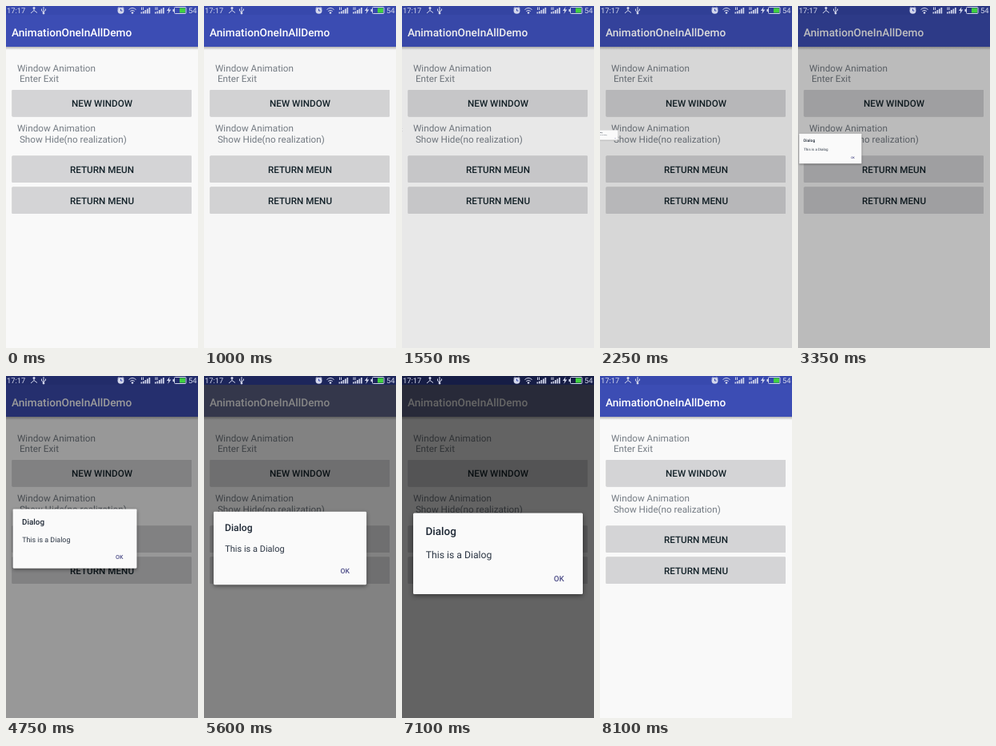
An HTML page for the animation above (8.15 s loop, 240 by 428 pixels).

```html
<!DOCTYPE html>
<html lang="en">
<head>
<meta charset="utf-8">
<title>Window animation demo</title>
<style>
  html, body { margin: 0; width: 100%; height: 100%; overflow: hidden; background: #f9f9f9; }
  svg { display: block; width: 100vw; height: 100vh; }
  text { font-family: Roboto, sans-serif; text-rendering: geometricPrecision; white-space: pre; }
  .label { font-size: 11.7px; fill: #757c84; }
  .caption { font-size: 11.7px; font-weight: 500; fill: #14232a; text-anchor: middle; }
  .button { fill: #d4d4d6; filter: drop-shadow(0 .6px .6px rgba(0, 0, 0, .2)); }
  .status text { font-size: 9.4px; fill: #d3d7ec; }
  .line { fill: none; stroke: #d3d7ec; stroke-width: 1; }
  .solid { fill: #d3d7ec; }
  #card { filter: drop-shadow(0 2px 3px rgba(0, 0, 0, .45)); }
</style>
</head>
<body>
<svg viewBox="0 0 240 428" preserveAspectRatio="none">
  <defs>
    <linearGradient id="shade" x1="0" y1="0" x2="0" y2="1">
      <stop offset="0" stop-color="#000" stop-opacity=".28"/>
      <stop offset="1" stop-color="#000" stop-opacity="0"/>
    </linearGradient>
    <g id="signal">
      <path class="solid" d="M0 9.500V7.500H1.700V9.500ZM2.500 9.500V6.500H4.200V9.500ZM5 9.500V5H6.700V9.500ZM7.500 9.500V3.500H9.200V9.500ZM10 9.500V2H11.700V9.500Z"/>
      <path class="line" d="M1 1.500V5M3 1.500V5"/>
    </g>
  </defs>

  <rect width="240" height="428" fill="#f9f9f9"/>
  <rect width="240" height="51" fill="#3c4db4"/>
  <rect width="240" height="11" fill="#3849ae"/>
  <rect id="grey" y="11" width="240" height="40" fill="#737582" opacity="0"/>
  <rect y="51" width="240" height="4" fill="url(#shade)"/>
  <text x="7" y="37.800" font-size="13.650" font-weight="500" fill="#fff">AnimationOneInAllDemo</text>

  <text class="label" x="14" y="82">Window Animation</text>
  <text class="label" x="16.900" y="95.300">Enter Exit</text>
  <text class="label" x="14" y="157">Window Animation</text>
  <text class="label" x="16.900" y="170.500">Show Hide(no realization)</text>
  <g id="buttons"></g>

  <rect id="dim" width="240" height="428" opacity="0"/>

  <g class="status">
    <text x="1" y="8.600">17:17</text>
    <path class="line" d="M35 2V5.500L31 9M35 5.500L39 8.500" stroke-width="1.400"/>
    <circle class="solid" cx="35" cy="2.500" r="1.500"/>
    <path class="line" d="M47 1V10M44.500 3.500V6L47 8M49.500 3.500V5.500L47 7" stroke-width="1.300"/>
    <circle class="solid" cx="47" cy="9" r="1.400"/>
    <circle class="solid" cx="143.500" cy="5.800" r="4"/>
    <path class="line" d="M139.500 3L141.500 1.300M147.500 3L145.500 1.300"/>
    <path d="M143.500 3.500V6H145.500" fill="none" stroke="#3849ae"/>
    <path class="line" d="M153.500 4.500Q158 .5 162.500 4.500M155.200 6.500Q158 4 160.800 6.500" stroke-width="1.200"/>
    <circle class="solid" cx="158" cy="8.500" r="1.300"/>
    <use href="#signal" x="168.500"/>
    <use href="#signal" x="186"/>
    <path class="solid" d="M204.500 1L201 6H203.300L202.300 10L206.300 4.600H203.900Z"/>
    <rect class="line" x="210.500" y="1.500" width="14.500" height="8" rx="1"/>
    <rect class="solid" x="208.500" y="4" width="1.500" height="3"/>
    <rect x="217" y="2.500" width="7" height="6" fill="#3fd040"/>
    <text x="228" y="8.600">54</text>
  </g>

  <g id="dialog" visibility="hidden">
    <rect id="card" x="20" y="18.500" width="212" height="101.500" rx="1.500" fill="#fafafa"/>
    <text x="35.500" y="45.800" font-size="13.500" font-weight="500" fill="#1d2734">Dialog</text>
    <text x="35.800" y="74.800" font-size="12.200" fill="#2c3644">This is a Dialog</text>
    <text x="195.800" y="104.300" font-size="9.700" font-weight="500" fill="#4d4d88">OK</text>
  </g>
</svg>
<script>
  const LOOP = 8150, STEP = 50;
  const ENTER = [900, 6800], EXIT = [7200, 7950];
  const $ = id => document.getElementById(id);

  $('buttons').innerHTML = [
    [105, 'NEW WINDOW'], [187.5, 'RETURN MEUN'], [226.5, 'RETURN MENU']
  ].map(([y, name]) => `
    <rect class="button" x="7.500" y="${y}" width="224.500" height="33.500" rx="1"/>
    <text class="caption" x="120" y="${y + 21}">${name}</text>`).join('');

  const part = (t, [from, to]) => Math.min(1, Math.max(0, (t - from) / (to - from)));
  const ease = p => (1 - Math.cos(Math.PI * p)) / 2;

  function draw(t) {
    const shown = part(t, ENTER), gone = part(t, EXIT);
    const scale = ease(shown) * (1 - ease(gone));
    const level = shown * (1 - gone);
    $('dim').setAttribute('opacity', 0.6 * level);
    $('grey').setAttribute('opacity', 0.75 * part(level, [0.65, 0.8]));
    // The window grows from its own top left corner.
    $('dialog').setAttribute('transform', `translate(-6 153) scale(${scale})`);
    $('dialog').setAttribute('visibility', scale > 0.002 ? 'visible' : 'hidden');
  }

  const start = performance.now();
  function tick() {
    const t = (performance.now() - start) % LOOP;
    draw(Math.floor(t / STEP) * STEP);
    requestAnimationFrame(tick);
  }
  tick();
</script>
</body>
</html>
```
